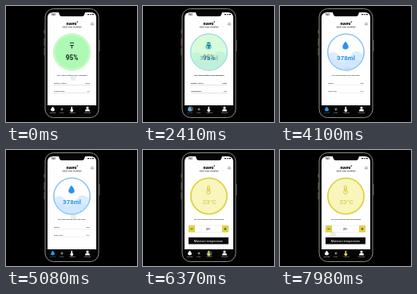
Recreate the animation shown at these times as an HTML page. Size 164x146 px, loop 8000 ms.

```html
<!DOCTYPE html>
<html lang="en">
<head>
<meta charset="utf-8">
<style>
  html, body { margin: 0; width: 100%; height: 100%; overflow: hidden; background: #000; }
  svg { display: block; width: 100%; height: 100%; font-family: Roboto, Arial, sans-serif; }
  text { text-anchor: middle; }
  .row text { font-size: 2.5px; font-weight: 500; fill: #333; text-anchor: start; }
  .row .value { text-anchor: end; }
  .note { font-size: 2.4px; font-weight: 500; fill: #222; }
  .tab { fill: #fff; font-size: 2.2px; }
</style>
</head>
<body>
<svg viewBox="0 0 164 146">
  <defs><clipPath id="dial"><circle cx="82.5" cy="58" r="22"/></clipPath></defs>
  <rect width="164" height="146"/>
  <path d="M48 30v5M48 41v9M48 53v9M117 43v14" stroke="#8d8b7e" stroke-width=".7"/>
  <rect x="49" y="3.5" width="67" height="137" rx="10.5" fill="#050505" stroke="#8d8b7e"/>
  <path d="M52 125V15q0-7 7-7h47q7 0 7 7v110z" fill="#fff"/>
  <path d="M65 7.500h35q-1 0-1.500 2-.7 3.500-3.500 3.500H70q-2.800 0-3.500-3.500-.5-2-1.500-2z" fill="#050505"/>
  <text x="59.500" y="11.500" font-size="2.600" font-weight="700">9:41</text>
  <path d="M102 10.700h2M105 10.700h1.500M107.500 10.700h2.500" stroke="#222" stroke-width="1.200"/>
  <text x="82" y="23.500" font-size="5" font-weight="900">nuvro</text>
  <circle cx="89.300" cy="20" r=".8"/>
  <text x="82.500" y="26.800" font-size="2.500" font-weight="700">Smart daily hydration</text>
  <path d="M106.300 23.300q1.700-5 3.400 0zM107.500 24.300h1" fill="none" stroke="#555" stroke-width=".5"/>

  <g id="battery">
    <circle cx="82.500" cy="58" r="23.500" fill="#aefab4"/>
    <circle cx="82.500" cy="58" r="22" fill="none" stroke="#dcfddf" stroke-width=".9"/>
    <path d="M80 46.500h5M80 49.500h5M82.500 49.500v4" fill="none" stroke="#173b1c" stroke-width="1.100"/>
    <text x="82.500" y="67.700" font-size="8.300" font-weight="700" fill="#112d15">95%</text>
    <text class="note" x="82.500" y="88">Your current battery level remaining</text>
    <g class="row">
      <text x="60" y="97.800">Battery status</text><text class="value" x="105" y="97.800">Good</text>
      <text x="60" y="107.800">Charge time</text><text class="value" x="105" y="107.800">2 h</text>
      <path d="M60 99.500h45M60 109.500h45" stroke="#bbb" stroke-width=".4"/>
    </g>
  </g>

  <g id="water">
    <circle cx="82.500" cy="58" r="22.700" fill="#fff" stroke="#86c3fb" stroke-width="1.600"/>
    <g clip-path="url(#dial)" fill="#d0e7fd">
      <path d="M58 62q6-4 9-4c6 0 9 9 15 9s7-10 13-10q5 0 12 6v20H58z" opacity=".75"/>
      <path d="M58 67q8-2 14 2t12 0 10-2 13 1v16H58z"/>
    </g>
    <path d="M82 44.500q7.500 9 0 10.300-7.500-1.300 0-10.300z" fill="#2793ee"/>
    <text x="82.500" y="67.500" font-size="8" font-weight="700" fill="#2793ee">378ml</text>
    <text class="note" x="82" y="88">You have reached your daily goal</text>
    <g class="row">
      <text x="60" y="97.800">Intake</text><text class="value" x="105" y="97.800">500</text>
      <text x="60" y="107.800">Daily goal</text><text class="value" x="105" y="107.800">2.0 l</text>
      <path d="M60 99.500h45M60 109.500h45" stroke="#ddd" stroke-width=".4"/>
    </g>
  </g>

  <g id="heat">
    <circle cx="82.500" cy="58" r="22.600" fill="#f8f5bd" stroke="#ded342" stroke-width="1.800"/>
    <path d="M80.700 51v-5q1.300-2.500 2.600 0v5a2.400 2.400 0 1 1-2.600 0zM82 48v5" fill="none" stroke="#d5c42e" stroke-width=".9"/>
    <text x="83" y="67.700" font-size="8" fill="#d5c42e">23°C</text>
    <text class="note" x="82.500" y="88">Set your desired water temperature</text>
    <rect x="57" y="95" width="50" height="8.500" fill="#fff" stroke="#ddd" stroke-width=".4"/>
    <path d="M57 95h8v8.500h-8zM99 95h8v8.500h-8z" fill="#ded342"/>
    <path d="M59.500 99.300h3M101.500 99.300h3M103 97.800v3" stroke="#222" stroke-width=".7"/>
    <text x="82" y="100.500" font-size="3.500" font-weight="500">21°</text>
    <rect x="57" y="110" width="50" height="8.500" fill="#080808"/>
    <text x="82" y="115.600" font-size="3.800" fill="#fff">Maintain temperature</text>
  </g>

  <g class="tab" id="waterTab"><path d="M58.500 126.500q5 5.500 0 6-5-.5 0-6z"/><text x="58.500" y="135">Hydrate</text></g>
  <g class="tab" opacity=".8"><path d="M68.500 130h3M70 128.500v3" stroke="#fff" stroke-width=".8"/><text x="69.500" y="135">Clean</text></g>
  <g class="tab" id="heatTab"><path d="M81.500 126.800h1.600v3a1.800 1.800 0 1 1-1.600 0z"/><text x="83" y="135">Heating</text></g>
  <g class="tab"><circle cx="102" cy="128" r="1.600"/><path d="M99 132.600q0-3 3-3t3 3z"/><text x="102" y="135">Settings</text></g>
  <circle id="touch" r="3.500" fill="#ccc"/>
</svg>
<script>
  const $ = id => document.getElementById(id);
  const easeOut = p => 1 - (1 - p) ** 2;
  const easeInOut = p => p < .5 ? 2 * p * p : 1 - 2 * (1 - p) ** 2;
  const center = [84.5, 79.5], left = [59.5, 129.5], middle = [83, 130.5];

  // start, duration, from, to, easing
  const moves = [
    [1230, 760, [84, 90.5], left, easeOut],
    [3340, 760, left, center, easeOut],
    [4870, 1010, center, middle, easeInOut],
    [7330, 1000, middle, [61, 98], easeInOut]
  ];

  function touchAt(t) {
    const [start, duration, from, to, ease] = moves.findLast(m => t >= m[0]) || moves[0];
    const p = ease(Math.min(1, Math.max(0, (t - start) / duration)));
    return from.map((v, i) => v + (to[i] - v) * p);
  }

  function draw(now) {
    const t = now % 8000;
    const fade = t < 2410 ? 0 : t < 2460 ? .5 : 1;
    const heat = t >= 6370;
    $('battery').style.opacity = fade < 1 ? 1 : 0;
    $('water').style.opacity = heat ? 0 : fade;
    $('heat').style.opacity = heat ? 1 : 0;
    $('waterTab').style.fill = fade && !heat ? '#2793ee' : '#fff';
    $('heatTab').style.fill = heat ? '#ded342' : '#fff';

    const [x, y] = touchAt(t);
    const pressed = (t >= 2200 && t < 2410) || (t >= 6160 && t < 6370);
    $('touch').setAttribute('cx', x);
    $('touch').setAttribute('cy', y);
    $('touch').style.opacity = pressed ? .6 : .35;
    requestAnimationFrame(draw);
  }
  requestAnimationFrame(draw);
</script>
</body>
</html>
```
